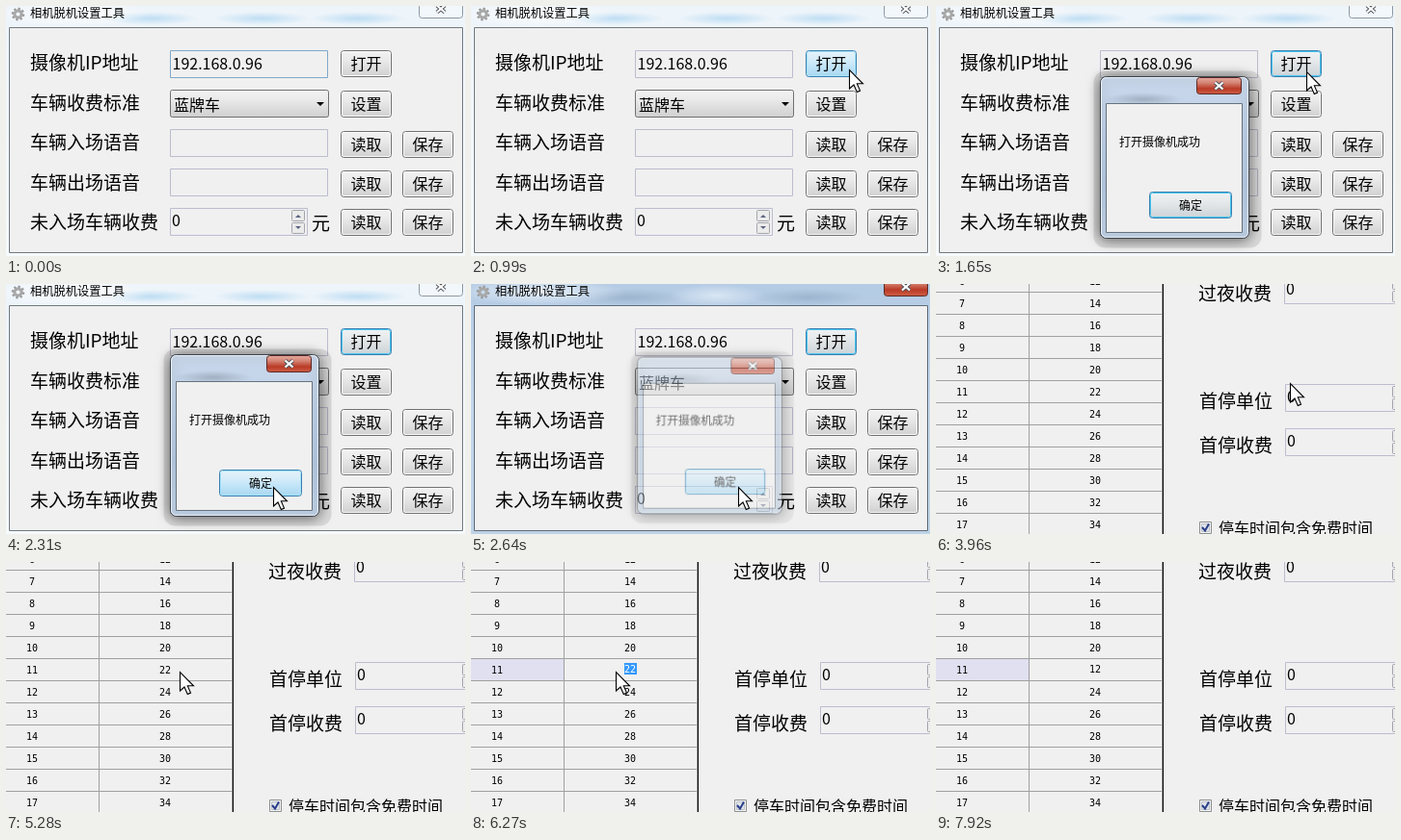
Animation of 476 by 260 pixels, one loop 8000 ms. Source, as an HTML page with a canvas:

```html
<!DOCTYPE html>
<html lang="zh">
<head>
<meta charset="utf-8">
<style>
html, body { margin: 0; width: 100%; height: 100%; overflow: hidden; background: #f0f0f0; }
canvas { display: block; }
</style>
</head>
<body>
<canvas id="stage" width="476" height="260"></canvas>
<script>
const stage = document.getElementById('stage').getContext('2d');
const layer = new OffscreenCanvas(476, 260).getContext('2d');
let ctx = stage;
const LOOP = 8000, STEP = 330;
const SANS = '"Noto Sans CJK SC", "Noto Sans CJK", sans-serif';
const MONO = '"DejaVu Sans Mono", monospace';

const buttonLooks = {
  normal: { fill: ['#f2f2f2', '#ebebeb', '#dddddd', '#cfcfcf'], edge: '#707070', inner: '#fafafa' },
  focus: { fill: ['#f0f2f3', '#e8ebed', '#d9dee1', '#cbd2d6'], edge: '#3c7fb1', inner: '#45c4ee' },
  hover: { fill: ['#e6f3fb', '#d6edf9', '#bce2f7', '#a7d6f0'], edge: '#3c7fb1', inner: '#a5e2f7' }
};

// Pointer tip from the given step until the next entry.
const pointerPath = [
  [0, null], [2, [467, 126]], [3, [392, 66]], [4, [384, 68]], [6, [288, 185]],
  [7, [277, 211]], [10, [332, 145]], [11, [367, 103]], [13, [216, 118]],
  [14, [187, 109]], [15, [187, 112]], [16, [180, 114]], [19, [150, 114]],
  [20, [147, 114]], [23, [255, 216]], [24, null]
];

function rect(x, y, w, h, fill) {
  ctx.fillStyle = fill;
  ctx.fillRect(x, y, w, h);
}

function vertical(y, h, ...colors) {
  const g = ctx.createLinearGradient(0, y, 0, y + h);
  colors.forEach((c, i) => g.addColorStop(i / (colors.length - 1), c));
  return g;
}

function box(x, y, w, h, fill, stroke, r = 0) {
  ctx.beginPath();
  ctx.roundRect(x + .5, y + .5, w - 1, h - 1, r);
  if (fill) { ctx.fillStyle = fill; ctx.fill(); }
  if (stroke) { ctx.strokeStyle = stroke; ctx.lineWidth = 1; ctx.stroke(); }
}

// Text placed by the vertical centre of its CJK em box.
function text(str, x, cy, size, color = '#000', align = 'left') {
  ctx.font = size + 'px ' + SANS;
  ctx.textAlign = align;
  ctx.fillStyle = color;
  ctx.fillText(str, x, Math.round(cy + size * .37));
}

function number(n, x, cy, color = '#000') {
  ctx.font = '10px ' + MONO;
  ctx.textAlign = 'center';
  ctx.fillStyle = color;
  ctx.fillText(n, x, cy + 4);
}

function button(x, y, w, h, label, state = 'normal', size = 16) {
  const look = buttonLooks[state];
  box(x, y, w, h, vertical(y, h, ...look.fill), look.edge, 3);
  box(x + 1, y + 1, w - 2, h - 2, null, look.inner, 2);
  text(label, x + w / 2, y + h / 2 + .5, size, '#000', 'center');
}

function triangle(x, y, w, h, color) {
  ctx.beginPath();
  ctx.moveTo(x, y);
  ctx.lineTo(x + w, y);
  ctx.lineTo(x + w / 2, y + h);
  ctx.fillStyle = color;
  ctx.fill();
}

function field(x, y, w, h, value, focused = false) {
  box(x, y, w, h, '#f0f0f0', focused ? '#7fa8c9' : '#bcbcd0');
  text(value, x + 2.5, y + 14, 16);
}

function spinBox(x, y, w, h) {
  field(x, y, w, h, '');
  text('0', x + 2, y + 13, 16);
  const bx = x + w - 17, half = (h - 5) / 2;
  for (const top of [y + 2, y + 3 + half]) box(bx, top, 14, half, '#ebebeb', '#a4a4ae', 1);
  triangle(bx + 4, y + 10, 6, -3, '#5a6480');
  triangle(bx + 4, y + h - 10, 6, 3, '#5a6480');
}

function closeButton(x, y, w, h, active) {
  box(x, y, w, h, active ? vertical(y, h, '#e3ada3', '#d58373', '#b93a26', '#d0624a')
                         : 'rgba(255,255,255,.25)', active ? '#5c2a26' : '#8d99a5', 3);
  const cx = x + w / 2, cy = y > 0 ? y + h / 2 : 3;
  for (const [color, width] of [['#4b5058', 4], ['#fff', 2.2]]) {
    ctx.strokeStyle = color;
    ctx.lineWidth = width;
    ctx.beginPath();
    for (const s of [-1, 1]) {
      ctx.moveTo(cx - 4, cy - 3.5 * s);
      ctx.lineTo(cx + 4, cy + 3.5 * s);
    }
    ctx.stroke();
  }
}

function gear(cx, cy) {
  ctx.strokeStyle = '#9a9a9a';
  ctx.lineWidth = 2.4;
  ctx.beginPath();
  for (let i = 0; i < 8; i++) {
    const a = i * Math.PI / 4 + .2;
    ctx.moveTo(cx + 4 * Math.cos(a), cy + 4 * Math.sin(a));
    ctx.lineTo(cx + 6.8 * Math.cos(a), cy + 6.8 * Math.sin(a));
  }
  ctx.stroke();
  ctx.beginPath();
  ctx.arc(cx, cy, 3.6, 0, 7);
  ctx.strokeStyle = '#a8a8a8';
  ctx.lineWidth = 3;
  ctx.stroke();
}

function glow(x, y, rx, ry, color) {
  ctx.save();
  ctx.translate(x, y);
  ctx.scale(rx, ry);
  const g = ctx.createRadialGradient(0, 0, 0, 0, 0, 1);
  g.addColorStop(0, color);
  g.addColorStop(1, color.replace(/[\d.]+\)$/, '0)'));
  rect(-1, -1, 2, 2, g);
  ctx.restore();
}

function mainWindow(step) {
  const active = step >= 8;
  rect(0, 0, 476, 260, active ? vertical(0, 260, '#b4cbe4', '#c3d6ea', '#bed2e6')
                              : vertical(0, 260, '#edf4fa', '#f2f7fb', '#f6fafd'));
  if (active) {
    for (const x of [165, 350]) glow(x, 14, 60, 9, 'rgba(140,165,192,.6)');
    glow(255, 12, 50, 12, 'rgba(225,236,247,.8)');
    glow(70, 8, 90, 14, 'rgba(240,246,252,.85)');
  } else {
    for (const x of [150, 265, 365]) glow(x, 13, 50, 7, 'rgba(170,212,240,.7)');
    glow(70, 8, 80, 14, 'rgba(255,255,255,.9)');
  }
  box(3, 22, 471, 235, '#f0f0f0', active ? '#5d6b78' : '#707880');
  gear(12.5, 8.5);
  text('相机脱机设置工具', 25, 7.5, 12.25);
  closeButton(428, -8, 46, 21, active);

  ['摄像机IP地址', '车辆收费标准', '车辆入场语音', '车辆出场语音', '未入场车辆收费']
    .forEach((label, i) => text(label, 25, 59 + i * 41.5, 19));

  field(170, 46, 164, 29, '192.168.0.96', step === 0);
  const comboFill = step < 11 ? buttonLooks.normal.fill : ['#ecf0f2', '#e0e6e9', '#ccd6db', '#bfcbd1'];
  box(170, 87, 165, 29, vertical(87, 29, ...comboFill), '#707070', 2);
  text('蓝牌车', 174, 103, 16);
  triangle(322, 100, 8, 4, '#000');
  field(170, 128, 164, 29, '');
  field(170, 169, 164, 29, '');
  spinBox(170, 210, 143, 29);
  text('元', 317, 226, 19);

  const openState = step === 3 ? 'hover' : step > 3 && step < 11 ? 'focus' : 'normal';
  button(347, 46, 53, 28, '打开', openState);
  button(347, 88, 53, 28, '设置', step === 11 ? 'hover' : 'normal');
  for (const y of [130, 171, 211]) {
    button(347, y, 53, 28, '读取');
    button(411, y, 53, 28, '保存');
  }
}

// Painted on its own layer so that it fades as one piece.
function dialog(opacity, scale, okState) {
  ctx = layer;
  ctx.clearRect(0, 0, 476, 260);
  box(163, 67, 175, 185, 'rgba(0,0,0,.1)', null, 12);
  ctx.shadowColor = 'rgba(0,0,0,.6)';
  ctx.shadowBlur = 14;
  ctx.shadowOffsetY = 1;
  box(170, 73, 155, 169, vertical(73, 169, '#cbd9ec', '#bccfe6', '#b3c8e0', '#c0d2e6'), '#3b444d', 6);
  ctx.shadowColor = 'transparent';
  box(171, 74, 153, 167, null, 'rgba(255,255,255,.7)', 5);
  glow(215, 97, 40, 7, 'rgba(125,140,155,.5)');
  box(176, 101, 142, 135, '#f0f0f0', '#66727e');
  closeButton(270, 74, 47, 18, true);
  text('打开摄像机成功', 190, 142, 12);
  button(221, 193, 86, 28, '确定', okState, 12);

  ctx = stage;
  ctx.save();
  ctx.globalAlpha = opacity;
  ctx.translate(247.5, 158);
  ctx.scale(scale, scale);
  ctx.drawImage(layer.canvas, -247.5, -158);
  ctx.restore();
}

function tableView(step) {
  rect(0, 0, 476, 260, '#f0f0f0');
  if (step >= 17) rect(0, 101, 96, 22, '#e0e0f0');
  for (let n = 6; n <= 17; n++) {
    const cy = 20 + (n - 7) * 23;
    rect(0, cy + 11, 235, 1, '#a0a0a0');
    number(n, 27, cy);
    if (n !== 11 || step < 17) number(n * 2, 165, cy);
  }
  rect(96, 0, 1, 260, '#a0a0a0');
  rect(234, 0, 1, 260, '#a0a0a0');
  rect(235, 0, 1, 260, '#000');
  if (step >= 17) cellEditor(step);

  text('过夜收费', 272, 10, 19);
  text('首停单位', 273, 122, 19);
  text('首停收费', 273, 168, 19);
  spinBox(361, -8, 129, 29);
  spinBox(362, 104, 128, 29);
  spinBox(362, 150, 128, 29);

  box(273, 247, 13, 13, '#f4f4f4', '#8e8f8f');
  box(275, 249, 9, 9, '#e2e6ea', '#b9c0c8');
  ctx.strokeStyle = '#2b3f8c';
  ctx.lineWidth = 2;
  ctx.beginPath();
  ctx.moveTo(276, 253);
  ctx.lineTo(279, 256.5);
  ctx.lineTo(283, 249.5);
  ctx.stroke();
  text('停车时间包含免费时间', 293, 254, 16);
}

function cellEditor(step) {
  const selected = step === 17 || (step >= 19 && step < 22);
  if (selected) rect(159, 105, 13, 12, '#3399ff');
  number(step < 22 ? 22 : 12, 165, 111, selected ? '#fff' : '#000');
  if (step === 21) rect(159, 105, 1, 12, '#cc6600');
  if (step === 22 || step === 23) rect(171, 105, 1, 12, '#000');
}

function pointer(x, y) {
  const outline = [[0, 0], [0, 19.5], [4.5, 15.5], [7.8, 23], [11, 21.6], [7.8, 14.3], [14, 14.3]];
  ctx.beginPath();
  for (const [dx, dy] of outline) ctx.lineTo(x + dx + .5, y + dy + .5);
  ctx.closePath();
  ctx.fillStyle = '#fff';
  ctx.fill();
  ctx.strokeStyle = '#000';
  ctx.lineWidth = 1.1;
  ctx.stroke();
}

function draw(time) {
  const step = Math.floor(time % LOOP / STEP);
  if (step < 12) {
    mainWindow(step);
    if (step === 4) dialog(.5, .96, 'focus');
    if (step >= 5 && step < 8) dialog(1, 1, step === 7 ? 'hover' : 'focus');
    if (step === 8) dialog(.55, .97, 'hover');
  } else {
    tableView(step);
  }
  const tip = pointerPath.findLast(([from]) => from <= step)[1];
  if (tip) pointer(...tip);
}

function tick() {
  draw(performance.now());
  requestAnimationFrame(tick);
}
tick();
</script>
</body>
</html>
```
